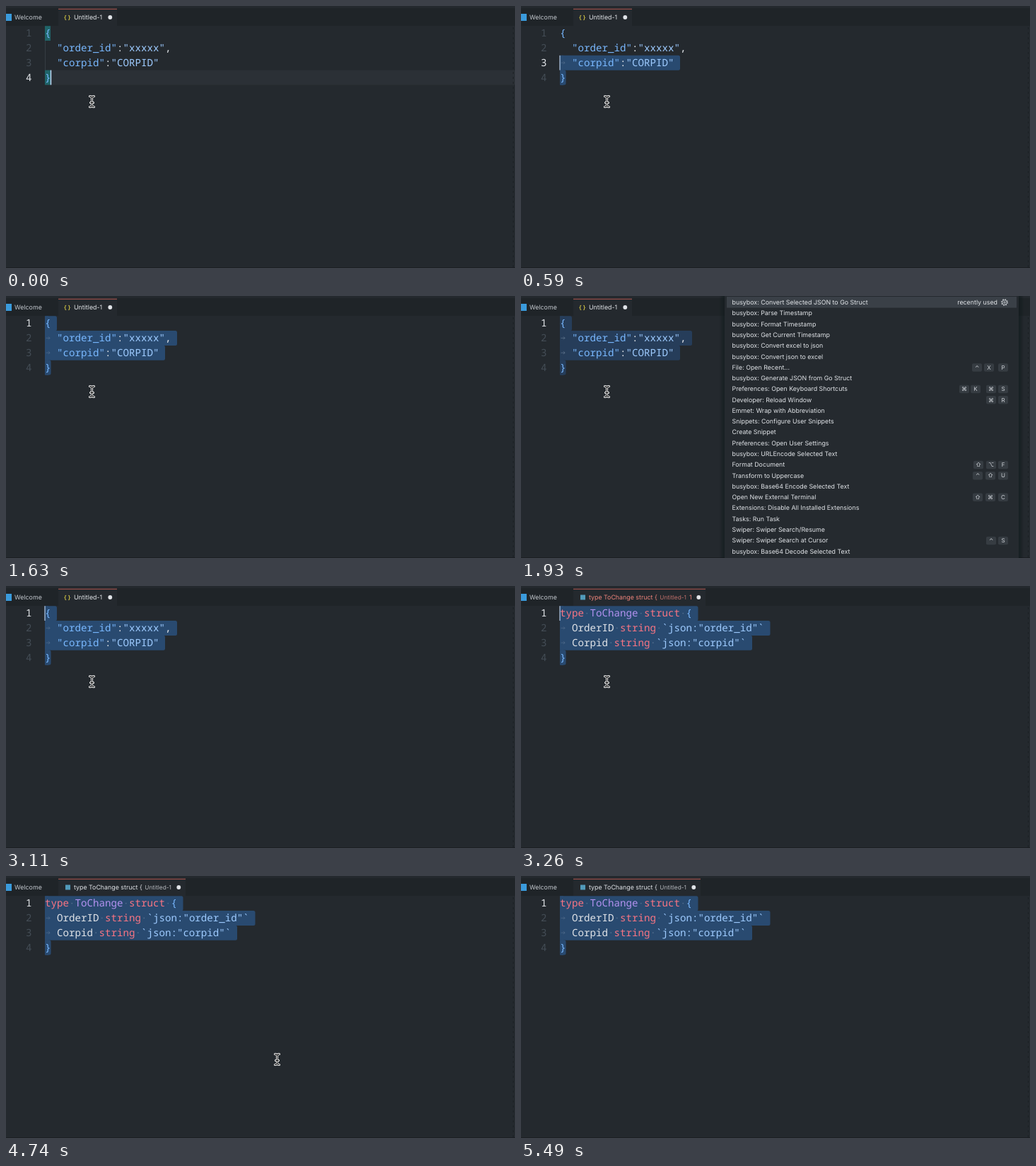
These frames come from a looping animation (720x370 px, 5.59 s). An HTML page:

```html
<!DOCTYPE html>
<html>
<head>
<meta charset="utf-8">
<style>
  html, body { margin: 0; width: 100%; height: 100%; overflow: hidden; background: #24292e; }
  svg { display: block; }
  text { white-space: pre; text-rendering: geometricPrecision; }
  .code { font: 14.167px "Noto Sans Mono", monospace; }
  .ui { font: 8.85px Inter, "DejaVu Sans", sans-serif; }
</style>
</head>
<body>
<svg id="stage" width="720" height="370" viewBox="0 0 720 370"></svg>
<script>
const LOOP = 5590, LEFT = 55, CHAR = 8.5, TOP = 28.2, LINE = 20.8;
const C = {
  fg: '#e1e4e8', key: '#79b8ff', str: '#9ecbff', word: '#f97583', type: '#b392f0',
  dim: '#444d56', cyan: '#519aba'
};

const json = [
  [['key', '{']],
  [['key', '  "order_id"'], ['fg', ':'], ['str', '"xxxxx"'], ['fg', ',']],
  [['key', '  "corpid"'], ['fg', ':'], ['str', '"CORPID"']],
  [['key', '}']]
];
const go = [
  [['word', 'type '], ['type', 'ToChange '], ['word', 'struct '], ['key', '{']],
  [['fg', '  OrderID '], ['word', 'string '], ['str', '`json:"order_id"`']],
  [['fg', '  Corpid '], ['word', 'string '], ['str', '`json:"corpid"`']],
  [['key', '}']]
];

// label, then shortcut keys as [symbol, x]
const commands = [
  ['busybox: Convert Selected JSON to Go Struct'],
  ['busybox: Parse Timestamp'],
  ['busybox: Format Timestamp'],
  ['busybox: Get Current Timestamp'],
  ['busybox: Convert excel to json'],
  ['busybox: Convert json to excel'],
  ['File: Open Recent...', ['⌃', 645], ['X', 662], ['P', 682]],
  ['busybox: Generate JSON from Go Struct'],
  ['Preferences: Open Keyboard Shortcuts', ['⌘', 627], ['K', 643], ['⌘', 665], ['S', 682]],
  ['Developer: Reload Window', ['⌘', 665], ['R', 682]],
  ['Emmet: Wrap with Abbreviation'],
  ['Snippets: Configure User Snippets'],
  ['Create Snippet'],
  ['Preferences: Open User Settings'],
  ['busybox: URLEncode Selected Text'],
  ['Format Document', ['⇧', 647], ['⌥', 665], ['F', 682]],
  ['Transform to Uppercase', ['⌃', 646], ['⇧', 664], ['U', 682]],
  ['busybox: Base64 Encode Selected Text'],
  ['Open New External Terminal', ['⇧', 646], ['⌘', 664], ['C', 682]],
  ['Extensions: Disable All Installed Extensions'],
  ['Tasks: Run Task'],
  ['Swiper: Swiper Search/Resume'],
  ['Swiper: Swiper Search at Cursor', ['⌃', 665], ['S', 682]],
  ['busybox: Base64 Decode Selected Text']
];

// Each step: start time and the values that change there
const steps = [
  [0, { lines: json, row: 3, sel: 4, caret: true, palette: false, tab: 'json', mouse: [121.5, 135] }],
  [590, { row: 2, sel: 2 }],
  [740, { row: 1, sel: 1 }],
  [890, { row: 0, sel: 0 }],
  [1630, { caret: false }],
  [1930, { palette: true }],
  [3110, { palette: false, caret: true }],
  [3260, { lines: go, tab: 'error' }],
  [3710, { caret: false }],
  [4000, { caret: true }],
  [4150, { tab: 'go' }],
  [4450, { caret: false }],
  [4740, { mouse: [383.5, 259] }],
  [4890, { mouse: [387.5, 261] }],
  [5040, { mouse: [693.5, 349], caret: true }],
  [5190, { mouse: [691.5, 352] }],
  [5340, { mouse: null }],
  [5490, { caret: false }]
];

const rect = (x, y, w, h, fill, more = '') =>
  `<rect x="${x}" y="${y}" width="${w}" height="${h}" fill="${fill}" ${more}/>`;
const text = (x, y, str, fill, cls = 'ui', more = '') =>
  `<text x="${x}" y="${y}" fill="${fill}" class="${cls}" ${more}>${str}</text>`;
const circle = (x, y, r, fill, more = '') =>
  `<circle cx="${x}" cy="${y}" r="${r}" fill="${fill}" ${more}/>`;
const path = (d, stroke, w, more = '') =>
  `<path d="${d}" fill="none" stroke="${stroke}" stroke-width="${w}" ${more}/>`;
const plain = line => line.map(part => part[1]).join('');
const rowTop = i => TOP + i * LINE;

function tabs(kind) {
  const right = { json: 157, error: 261, go: 254 }[kind];
  let s = rect(0, 3, 720, 25, '#1f2428') + rect(74, 3, right - 74, 25, '#24292e')
    + rect(74, 3.8, right - 74, 1, '#b0564f')
    + rect(0, 11, 8, 10, '#3a9bdc')
    + text(12, 19.2, 'Welcome', '#c3c8ce', 'ui', 'font-style="italic"');
  if (kind == 'json') {
    s += text(82, 19, '{ }', '#d9cb45', 'ui', 'style="font-size:8px;font-weight:600"')
      + text(96, 19.2, 'Untitled-1', C.fg);
  } else {
    const err = kind == 'error', ink = err ? '#f0857c' : C.fg;
    s += rect(84, 12.5, 7, 7, C.cyan) + text(96, 19.2, 'type ToChange struct {', ink)
      + text(196.3, 19.2, 'Untitled-1', ink, 'ui', 'opacity=".75" style="font-size:8.3px"');
    if (err) s += text(238, 19.2, '1', ink);
  }
  return s + circle(right - 9.7, 16, 2.9, C.fg);
}

function selection(lines, from, dull) {
  const fill = dull ? '#263d5a' : '#294a70';
  let s = '';
  lines.forEach((line, i) => {
    if (i < from) return;
    const str = plain(line), y = rowTop(i), mid = y + LINE / 2;
    const cols = str.length + (i < 3 ? 1 : 0);
    s += rect(LEFT, y, cols * CHAR, LINE + .2, fill, 'rx="2.5"') + rect(LEFT, y, 5, LINE + .2, fill);
    if (str[0] == ' ') s += path(`M56.5 ${mid}h5.5m-2-2l2 2l-2 2`, '#8fa3b8', .9, `opacity="${dull ? .45 : .3}"`);
    [...str].forEach((ch, col) => {
      if (ch == ' ' && col > 1) s += circle(LEFT + (col + .5) * CHAR, mid, .9, '#8fa3b8', 'opacity=".4"');
    });
  });
  return s;
}

function editor(st) {
  let s = '';
  if (st.sel > 3) {
    s += rect(64, rowTop(3), 656, LINE, '#2b3036')
      + rect(LEFT, rowTop(1), 1, 2 * LINE, '#353c43')
      + rect(LEFT, rowTop(0), 8, LINE, '#206468') + rect(LEFT, rowTop(3), 8, LINE, '#206468');
  } else s += selection(st.lines, st.sel, st.palette);
  st.lines.forEach((line, i) => {
    const y = rowTop(i) + 15;
    const spans = line.map(([c, str]) => `<tspan fill="${C[c]}">${str}</tspan>`).join('');
    s += text(28, y, i + 1, i == st.row ? C.fg : C.dim, 'code') + text(LEFT, y, spans, C.fg, 'code');
  });
  if (st.caret) s += rect(st.sel > 3 ? 62.8 : 54.3, rowTop(st.row), 1.4, LINE, '#c8e1ff', st.sel > 3 ? '' : 'opacity=".75"');
  return s;
}

function palette() {
  let s = '';
  for (let i = 1; i < 8; i++) s += rect(288 - i, -9, 416 + 2 * i, 400, '#15181b', 'opacity=".09"');
  s += rect(288, 0, 416, 370, '#252a2f') + rect(291, 1, 410, 15.6, '#3a4047');
  commands.forEach(([label, ...keys], i) => {
    const y = 9 + i * 15.28;
    s += text(298.5, y + 3.1, label, C.fg);
    for (const [k, x] of keys)
      s += rect(x - 7, y - 5.5, 14, 11.5, '#363c42', 'rx="2"')
        + text(x, y + 3, k, '#d1d5da', 'ui', 'text-anchor="middle" style="font-size:8px"');
  });
  return s + text(674, 12.1, 'recently used', C.fg, 'ui', 'text-anchor="end"')
    + circle(684, 9, 4.2, 'none', 'stroke="#d1d5da" stroke-width="1.3" stroke-dasharray="1.65"')
    + circle(684, 9, 3.3, 'none', 'stroke="#d1d5da" stroke-width=".8"')
    + circle(684, 9, 1.2, 'none', 'stroke="#d1d5da" stroke-width=".8"');
}

function pointer([x, y]) {
  const d = 'M-3-7.4Q0-7.4 0-5Q0-7.4 3-7.4M0-5V5M-3 7.4Q0 7.4 0 5Q0 7.4 3 7.4M-2 1.5H2';
  return `<g transform="translate(${x} ${y})" stroke-linecap="round">`
    + path(d, '#fff', 3) + path(d, '#111', 1.1) + '</g>';
}

function draw(st) {
  return rect(0, 0, 720, 370, '#24292e') + tabs(st.tab) + editor(st)
    + path('M717.5 30V369', '#1b1f23', 1, 'stroke-dasharray="3 4"')
    + rect(0, 369, 720, 1, '#1b1f23')
    + (st.palette ? palette() : '') + (st.mouse ? pointer(st.mouse) : '');
}

const stage = document.getElementById('stage');
const start = performance.now();
let shown = -1;
function tick() {
  const t = (performance.now() - start) % LOOP;
  const past = steps.filter(step => step[0] <= t);
  if (past.length != shown) {
    shown = past.length;
    stage.innerHTML = draw(Object.assign({}, ...past.map(step => step[1])));
  }
  requestAnimationFrame(tick);
}
tick();
</script>
</body>
</html>
```
